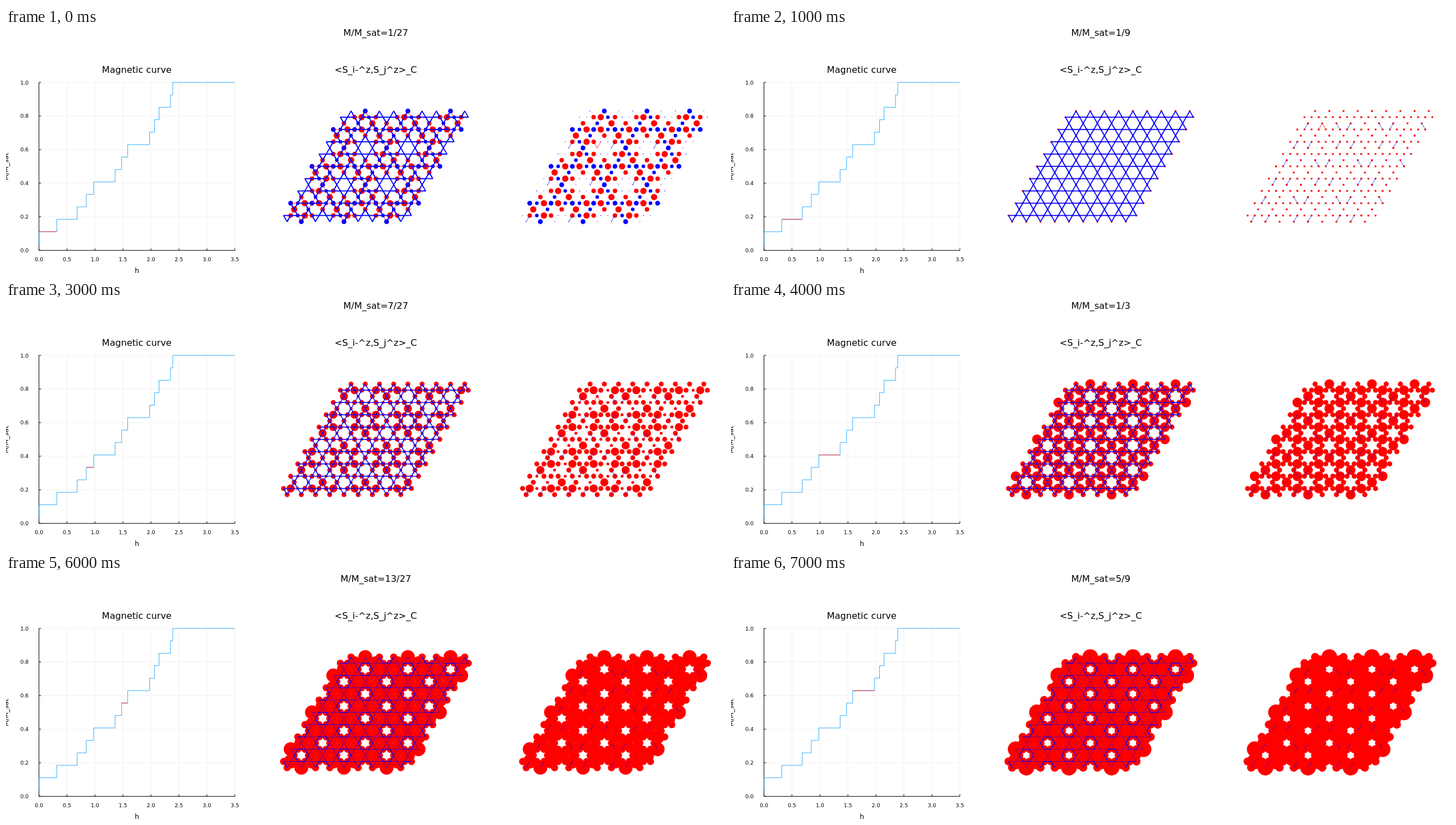
Recreate the animation shown at these times as an HTML page with a canvas. Size 1280 by 437 pixels, loop 8 s.

```html
<!DOCTYPE html>
<html lang="en">
<head>
<meta charset="utf-8">
<title>Magnetic curve</title>
<style>
  html, body { margin: 0; width: 100%; height: 100%; overflow: hidden; background: #fff; }
  canvas { display: block; }
</style>
</head>
<body>
<canvas id="stage" width="1280" height="437"></canvas>
<script>
const ctx = document.getElementById('stage').getContext('2d');
const BLUE = '#00f', RED = '#f00';
const CELLS = 9, STATES = 8;
const CORNERS = [[2, 0], [1, 1], [-1, 1], [-2, 0], [-1, -1], [1, -1]];

// Kind of a kagome site: p/q and a/b alternate around hexagons, u and v are star tips.
function kindOf(col, row) {
  for (let hex = 0; hex < 3; hex++) {
    for (let d = 0; d < 6; d++) {
      const dc = col + 1 - CORNERS[d][0], dr = row - 4 * hex - CORNERS[d][1];
      if (dr % 6 === 0 && (dc - dr) % 12 === 0) return ['pq', 'ab', 'ba'][hex][d % 2];
    }
  }
  return row % 3 ? 'v' : 'u';
}

const sites = new Map(), bonds = [], markedBonds = [];
const at = (col, row) => sites.get(col + ',' + row);
const addSite = (col, row) => sites.set(col + ',' + row,
  { col, row, x: 494.1 + 6.325 * col, y: 345.4 - 10.96 * row, kind: kindOf(col, row) });

for (let s = 0; s <= CELLS; s++) {
  for (let k = 0; k < CELLS; k++) addSite(2 * s + 4 * k + 1, 2 * s);
  for (let i = 0; s < CELLS && i <= 2 * CELLS; i++) addSite(2 * (s + i), 2 * s + 1);
}
for (const site of sites.values())
  for (const [dc, dr] of CORNERS.slice(0, 3)) {
    const next = at(site.col + dc, site.row + dr);
    if (next) bonds.push([site, next]);
  }
for (let s = 0; s <= CELLS; s++)
  for (let k = 0; k < CELLS; k++) {
    const col = 2 * s + 4 * k + 1, row = 2 * s, third = k % 3;
    if (s % 3 === 0 && s < CELLS && third < 2) markedBonds.push([at(col, row), at(col + 1, row + 1)]);
    if (s % 3 === 2 && third !== 1) markedBonds.push([at(col, row), at(col + third - 1, row - 1)]);
  }

// Radii grow with the magnetization; a few states break the symmetry. Negative is blue.
const broken = {
  0: { u: -4.3, v: 4, a: 5.6, b: -3.2, p: -0.8, q: -0.6 },
  3: { u: 4.4, v: 7.2, a: 4.4, b: 2.6, p: 4.4, q: 4.4 },
  5: { p: 6.4, q: 4.4 }
};
function radii(n) {
  const tip = 2.72 * n - 0.087 * n * n - 0.79, ring = 0.85 + 0.92 * n;
  return { u: tip, v: tip, a: ring, b: ring, p: ring, q: ring, ...broken[n] };
}

function stroke(points, color, width) {
  ctx.beginPath();
  points.forEach(([x, y]) => ctx.lineTo(x, y));
  ctx.strokeStyle = color;
  ctx.lineWidth = width;
  ctx.stroke();
}
const line = (a, b, color, width) => stroke([[a.x, a.y], [b.x, b.y]], color, width);

function text(str, x, y, size, align = 'center') {
  ctx.font = `${size}px "DejaVu Sans", sans-serif`;
  ctx.textAlign = align;
  ctx.fillStyle = '#000';
  ctx.fillText(str, x, y);
}

const px = h => 58.7 + 99.65 * h;
const py = m => 396.7 - 299.7 * m;
const level = n => py((2 * n + 3) / 27);
const jumps = [0, 0.318, 0.683, 0.845, 0.978, 1.36, 1.475, 1.585,
  1.975, 2.065, 2.145, 2.35, 2.39, 3.5].map(px);

function drawChart(n) {
  const ticksX = [0, 0.5, 1, 1.5, 2, 2.5, 3, 3.5], ticksY = [0, 0.2, 0.4, 0.6, 0.8, 1];
  for (const h of ticksX) {
    stroke([[px(h), 97], [px(h), 396.7]], '#f0f0f0', 1);
    text(h.toFixed(1), px(h), 415.6, 9.4);
  }
  for (const m of ticksY) {
    stroke([[58.7, py(m)], [407.5, py(m)]], '#f0f0f0', 1);
    text(m.toFixed(1), 40.3, py(m) + 3.5, 9.4, 'right');
  }
  stroke([[58.7, 97], [58.7, 396.7], [407.5, 396.7]], '#000', 1);
  for (const h of ticksX) stroke([[px(h), 396.7], [px(h), 393]], '#000', 1);
  for (const m of ticksY) stroke([[58.7, py(m)], [62.4, py(m)]], '#000', 1);

  const steps = jumps.slice(1).flatMap((x, i) => [[jumps[i], level(i)], [x, level(i)]]);
  stroke([[px(0), py(1 / 27)], ...steps], '#009afa', 0.8);
  stroke([[jumps[n], level(n)], [jumps[n + 1], level(n)]], RED, 0.8);

  text('Magnetic curve', 232.7, 80.2, 16.1);
  text('h', 233, 437, 12.2);
  ctx.save();
  ctx.translate(4.2, 247);
  ctx.rotate(-Math.PI / 2);
  text('M/M_sat', 0, 0, 12);
  ctx.restore();
}

function drawDots(size) {
  for (const { x, y, kind } of sites.values()) {
    ctx.beginPath();
    ctx.arc(x, y, Math.abs(size[kind]), 0, 2 * Math.PI);
    ctx.fillStyle = size[kind] < 0 ? BLUE : RED;
    ctx.fill();
  }
}

// In the lowest state, neighbours of equal sign are joined by thin red lines.
function drawBonds(n, size) {
  for (const [a, b] of bonds) {
    const aligned = n === 0 && size[a.kind] * size[b.kind] > 5;
    const tip = /[uv]/.test(a.kind + b.kind);
    line(a, b, aligned ? RED : BLUE, aligned ? 0.8 : tip ? 2 - 0.22 * n : 1.8 - 0.06 * n);
  }
}

function drawMarkedBonds(n) {
  const shown = n ? markedBonds : markedBonds.filter(([a]) => a.kind === 'p');
  for (const [a, b] of shown) line(a, b, BLUE, 0.7);
  if (n > 3) return;
  const [col, row, side] = n ? [21, 16, -1] : [21, 12, -1];
  for (const dc of [side, -side]) line(at(col, row), at(col + dc, row - 1 + (n ? 0 : 2)), RED, 0.8);
}

function fraction(top, bottom) {
  while (top % 3 === 0 && bottom % 3 === 0) { top /= 3; bottom /= 3; }
  return top + '/' + bottom;
}

function draw(time) {
  const n = Math.floor(time / 1000) % STATES, size = radii(n);
  ctx.fillStyle = '#fff';
  ctx.fillRect(0, 0, 1280, 437);
  text('M/M_sat=' + fraction(2 * n + 1, 27), 658.3, 14, 16.1);
  text('<S_i-^z,S_j^z>_C', 658.3, 80.2, 16.1);
  drawChart(n);
  drawDots(size);
  drawBonds(n, size);
  ctx.save();
  ctx.translate(425.6, 0);
  drawDots(size);
  drawMarkedBonds(n);
  ctx.restore();
}

const start = performance.now();
function tick() {
  draw(performance.now() - start);
  requestAnimationFrame(tick);
}
tick();
</script>
</body>
</html>
```
